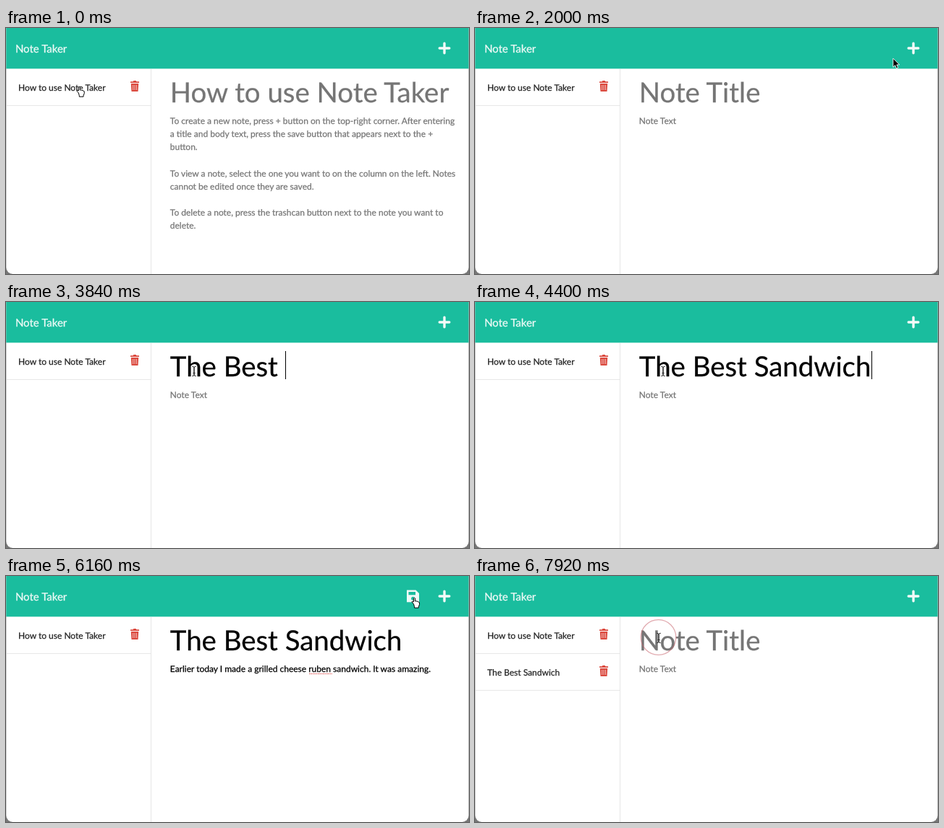
Animation, 640 px wide and 341 px high, one loop 8000 ms. Source, as an HTML page:

```html
<!DOCTYPE html>
<html lang="en">
<head>
<meta charset="utf-8">
<title>Note Taker</title>
<style>
  html, body { margin: 0; width: 100%; height: 100%; overflow: hidden; background: #fff; }
  svg { display: block; width: 640px; height: 341px; }
  text {
    font: 12px Lato, sans-serif; white-space: pre; text-rendering: geometricPrecision;
    color: #757575; fill: currentColor; stroke: currentColor; stroke-width: .25px;
  }
  .brand { font-size: 15px; color: #f0faf7; }
  .item text { color: #222; }
  .big { font-size: 38.4px; }
  .typed { color: #000; }
</style>
</head>
<body>
<svg viewBox="0 0 640 341">
  <defs>
    <g id="trash">
      <path fill="#db4a3f" d="M172 74.3h3.6l.8-1.3h3.2l.8 1.3h3.6v1.8h-12zM172.8 77h10.4l-.7 11h-9z"/>
      <path stroke="#fff" stroke-opacity=".7" stroke-width=".9" d="M175.6 79v7m2.4 0v-7m2.4 0v7"/>
    </g>
    <g id="card">
      <path stroke="#e8e8e8" d="M1 107.5H200"/>
      <use href="#trash"/>
    </g>
  </defs>

  <rect width="640" height="341" fill="#777"/>
  <rect x=".3" y="-20" width="639.2" height="361" rx="9" fill="#fff"/>
  <rect x=".3" width="639.2" height="56.4" fill="#1abd9e"/>
  <path stroke="#e6e6e6" d="M200.5 57V341"/>
  <text class="brand" x="12.9" y="34">Note Taker</text>
  <path stroke="#f4faf8" stroke-width="3.4" stroke-linecap="round" d="M599.2 28h13.6M606 21.2v13.6"/>
  <path id="save" fill="#eefaf7" fill-rule="evenodd" d="M554 19.5h12.5l4.5 4.5v12.3h-17zm2.5 2.5v4.3h9.5v-4.3zm5.9 6.8a2.4 2.4 0 1 0 .1 0z"/>

  <g class="item"><use href="#card"/><text x="17" y="87">How to use Note Taker</text></g>
  <g class="item" id="saved"><use href="#card" y="51"/><text x="17" y="138">The Best Sandwich</text></g>

  <text id="title" class="big" x="226.8" y="102.6"></text>
  <g id="body"></g>
  <path id="spelling" stroke="#e88482" stroke-width="1.6" stroke-dasharray="1.6 .8" d="M419 135.5h32"/>
  <path id="caret" stroke="#000"/>

  <circle id="ring" r="24.3" fill="none" stroke="#c8646e" stroke-opacity=".55" stroke-width="1.3"/>
  <g id="pointer">
    <path id="arrow" stroke="#fff" stroke-width=".9" d="M0 0v12.2l2.8-2.6 1.9 4.4 2.2-1-1.9-4.2h3.8z"/>
    <path id="hand" fill="#fff" stroke="#000" stroke-linejoin="round" d="M-1.2 9l-2.6-3 1-1 1.6 1v-5q1-1.6 2 0v4l2.2 0 2 .8 1.7 1v3l-1.2 3v1.4h-5.7v-1.4z"/>
    <path id="beam" fill="none" stroke="#222" d="M-2.7-6.7Q0-6.7 0-5V5Q0 6.7 2.7 6.7M2.7-6.7Q0-6.7 0-5V5Q0 6.7-2.7 6.7M-1.5 2.5h3"/>
  </g>
</svg>
<script>
const $ = id => document.getElementById(id);
const LOOP = 8000, CLEARED = 1680, FOCUS = 3280, BODY_FOCUS = 4480, SAVED = 6560;
const TITLE = "The Best Sandwich";
const BODY = "Earlier today I made a grilled cheese ruben sandwich. It was amazing.";
const HELP = `To create a new note, press + button on the top-right corner. After entering
a title and body text, press the save button that appears next to the +
button.

To view a note, select the one you want to on the column on the left. Notes
cannot be edited once they are saved.

To delete a note, press the trashcan button next to the note you want to
delete.`.split("\n");

// The pointer rests at each place until the next move begins.
const HOME = { x: 101.5, y: 81 };
const MOVES = [
  { from: 60, to: 240, x: 346, y: 128 },
  { from: 380, to: 1240, x: 610, y: 28 },
  { from: 1840, to: 2720, x: 246, y: 188 },
  { from: 2810, to: 3200, x: 260, y: 96 },
  { from: 5180, to: 5440, x: 578, y: 11 },
  { from: 5680, to: 6240, x: 564, y: 31 },
  { from: 6800, to: 7840, x: 254, y: 86 }
];
const CLICKS = [1600, 3200, 6480, 7840], PRESS = 200;

const within = (t, a, b) => t >= a && t < b;
const show = (id, on) => $(id).style.display = on ? "" : "none";
const ease = u => u * u * (3 - 2 * u);
const progress = (t, a, b) => Math.min(1, Math.max(0, (t - a) / (b - a)));
const typed = (text, t, a, b) => text.slice(0, Math.ceil(text.length * progress(t, a, b)));

const pointerAt = t => MOVES.reduce((p, m) => {
  const e = ease(progress(t, m.from, m.to));
  return { x: p.x + (m.x - p.x) * e, y: p.y + (m.y - p.y) * e };
}, HOME);

function cursorKind({ x, y }, canSave, saved) {
  const near = cx => Math.hypot(x - cx, y - 28) < 13;
  if (near(606) || canSave && near(563)) return "hand";
  if (x < 200 && y > 57 && y < (saved ? 158 : 107)) return "hand";
  return x > 226 && y > 66 ? "beam" : "arrow";
}

function setText(el, text, isTyped) {
  el.textContent = text;
  el.classList.toggle("typed", isTyped);
}

const lines = HELP.map((_, i) => {
  const line = document.createElementNS("http://www.w3.org/2000/svg", "text");
  line.setAttribute("x", 226.8);
  line.setAttribute("y", 133.2 + i * 18.1);
  return $("body").appendChild(line);
});

function draw(t) {
  const help = t < CLEARED, saved = t >= SAVED;
  const title = saved ? "" : typed(TITLE, t, 3360, 4320);
  const body = saved ? "" : typed(BODY, t, BODY_FOCUS, 5200);

  setText($("title"), help ? "How to use Note Taker" : title || "Note Title", title !== "");
  lines.forEach((line, i) =>
    setText(line, help ? HELP[i] : i ? "" : body || "Note Text", body !== ""));
  show("save", body);
  show("saved", saved);
  show("spelling", body.includes("ruben "));

  const inTitle = t < BODY_FOCUS;
  const field = inTitle ? $("title") : lines[0];
  const width = (inTitle ? title : body) ? field.getComputedTextLength() : 0;
  const x = Math.round(227 + width) + .5;
  $("caret").setAttribute("d", `M${x} ${inTitle ? "68V107" : "122V136"}`);
  show("caret", within(t, FOCUS, 5240));

  const p = pointerAt(t), kind = cursorKind(p, body, saved);
  $("pointer").setAttribute("transform", `translate(${p.x} ${p.y})`);
  show("pointer", !within(t, 2940, 3200));
  for (const id of ["arrow", "hand", "beam"]) show(id, id === kind);
  $("ring").setAttribute("transform", `translate(${p.x - .5} ${p.y - 1})`);
  show("ring", CLICKS.some(c => within(t, c, c + PRESS)));
}

const start = performance.now();
function tick() {
  draw((performance.now() - start) % LOOP);
  requestAnimationFrame(tick);
}
tick();
</script>
</body>
</html>
```
